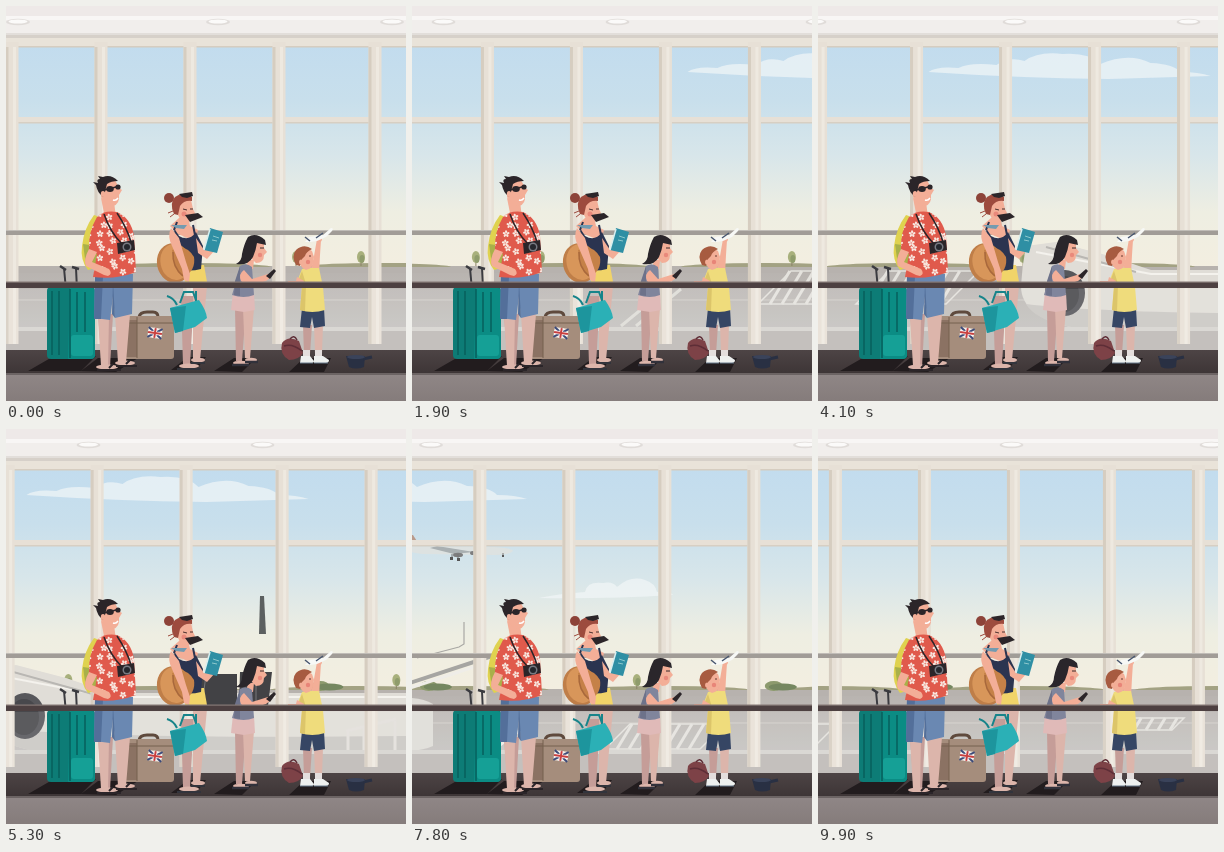
Recreate the animation shown at these times as an HTML page with a canvas. Size 400 by 395 pixels, loop 10 s.

```html
<!DOCTYPE html>
<html lang="en">
<head>
<meta charset="utf-8">
<title>Moving walkway</title>
<style>
html, body { margin: 0; width: 100%; height: 100%; overflow: hidden; background: #efebe9; }
canvas { display: block; width: 100%; height: 100%; }
</style>
</head>
<body>
<canvas id="c" width="400" height="395"></canvas>
<script>
const g = document.getElementById('c').getContext('2d');
const SKIN = '#f3ae97', SHADE = '#dc907c', LEG = '#dcb5ab', LEG_SHADE = '#c59d98', DARK = '#2b2529';

function box(color, x, y, w, h) {
  g.fillStyle = color;
  g.fillRect(x, y, w, h);
}
function fill(color, d) {
  g.fillStyle = color;
  g.fill(new Path2D(d));
}
function line(color, width, d) {
  g.strokeStyle = color;
  g.lineWidth = width;
  g.stroke(new Path2D(d));
}
function oval(color, x, y, rx, ry = rx, turn = 0) {
  g.fillStyle = color;
  g.beginPath();
  g.ellipse(x, y, rx, ry, turn, 0, 7);
  g.fill();
}
function round(color, x, y, w, h, r) {
  g.fillStyle = color;
  g.beginPath();
  g.roundRect(x, y, w, h, r);
  g.fill();
}
function at(x, y, draw) {
  g.save();
  g.translate(x, y);
  draw();
  g.restore();
}
function vertical(y0, y1, ...stops) {
  const grad = g.createLinearGradient(0, y0, 0, y1);
  stops.forEach((c, i) => grad.addColorStop(i / (stops.length - 1), c));
  return grad;
}
function random(seed) {
  return () => (seed = (seed * 16807) % 2147483647) / 2147483647;
}

const skyFill = vertical(38, 262, '#c2dcee', '#c8dfec', '#d8e6ea', '#eeeee2', '#f3eee0');
const roadFill = vertical(260, 330, '#b7b2ae', '#c6c4c1');

function clouds(n) {
  g.globalAlpha = 0.7;
  at(418 - 7.5 * n, 0, () => fill('#f3f7f8',
    'M0 66Q8 60 30 62Q42 56 68 59Q80 50 96 55Q110 45 134 48Q160 46 172 58Q200 46 222 57Q245 58 252 66Q270 66 282 70L180 73Q90 72 0 66'));
  at(1206 - 13.5 * n, 0, () => fill('#f3f7f8',
    'M-26 169Q-8 165 20 163Q22 152 38 154Q48 152 52 158Q66 146 80 151Q90 154 92 163Q104 161 108 166Q40 170 -26 169'));
  g.globalAlpha = 1;
}

function airliner(n) {
  at(22 * (n - 78), (n - 78) * 0.4, () => {
    fill('#dde2e1', 'M-20 117L82 118Q100 119 101 122Q98 126 82 126L10 125Q-10 122 -20 117');
    fill('#b99a8b', 'M-8 116L-4 106L1 106L8 117');
    fill('#a9b0b2', 'M62 123L25 117L18 119L42 125Z');
    oval('#7d7d7e', 46, 126, 5, 2.2);
    oval('#7d7d7e', 61, 124, 3, 2);
    line('#777', 1, 'M40 125V130M46 125V131M91 124V128');
    box('#555', 38, 128, 3, 3);
    box('#555', 45, 129, 3, 3);
    box('#555', 90, 126, 2, 2);
  });
}

function tree(x) {
  box('#8c8468', x - 0.5, 252, 1, 8);
  oval('#a8b07c', x, 251, 4, 6);
  oval('#8f9c6c', x + 1, 253, 2.5, 4);
}

function hatch(x, y, w, h) {
  line('#e4e2dd', 1.5, `M${x + h} ${y}H${x + w + h}L${x + w} ${y + h}H${x}Z`);
  for (let i = 12; i < w; i += 12) {
    line('#e4e2dd', 3, `M${x + i} ${y + h}L${x + i + h * 0.6} ${y}`);
  }
}

function ground(n) {
  box(roadFill, 0, 260, 400, 86);
  const far = -11.9 * n;
  for (let i = 0; i < 9; i++) oval('#a3a283', i * 200 + 180 + far, 261, 85, 4);
  box('#b7b2ae', 0, 261, 400, 6);
  [290, 355, 606, 693, 1021, 1153].forEach(x => tree(x + far));
  [945, 1290].forEach(x => {
    oval('#8c9a6d', x + far, 257, 9, 5);
    oval('#758760', x + far + 9, 258, 14, 3.5);
  });
  const near = -14 * n;
  line('#d2cfcb', 1, 'M0 294H400');
  hatch(612 + near, 265, 90, 33);
  hatch(1285 + near, 295, 95, 25);
  hatch(1690 + near, 289, 50, 12);
  line('#dedcd7', 3, `M${475 + near} 320L${520 + near} 283M${490 + near} 320L${535 + near} 283`);
}

function jet(n) {
  at(16 * (53 - n), 0, () => {
    fill('#5c6060', 'M253 205L254 167H258L260 205Z');
    line('#a9a8a4', 1.2, 'M405 229L447 218L452 215V193');
  });
  at(19 * (53 - n), 0, () => {
    fill('#e0ddd7', 'M-20 240L10 236L60 249L105 264H440Q490 270 490 290Q480 320 420 322H30Q-25 312 -25 280Q-24 260 -20 240');
    fill('#cac7c3', 'M-20 298Q100 312 480 306Q460 322 420 322H30Q-10 315 -20 298');
    line('#f4f2ed', 2, 'M-10 246L105 268H430');
    line('#b9b7b3', 2, 'M0 241L90 266');
    oval('#57575b', 19, 287, 20, 23);
    oval('#48484c', 18, 288, 15, 18);
    fill('#424245', 'M180 245H231V277H176ZM234 243H266L262 277H233Z');
    line('#77777a', 1, 'M200 246L196 276M250 244V276');
    line('#a6a5a2', 4, 'M430 268L555 227');
    line('#efede8', 3, 'M440 270L540 237');
    fill('#dedcd7', 'M440 272Q478 264 496 275V317Q470 328 440 314Z');
    oval('#4b484b', 455, 295, 18, 20);
    oval('#3e3b3f', 455, 295, 14, 16);
    line('#e2dfda', 3, 'M342 302V336M358 297V336M389 292V336M340 302L390 290');
    line('#ecebe6', 3, 'M520 330L580 290M538 334L585 300');
  });
}

function post(x) {
  box('#e7e0d6', x - 6.5, 36, 13, 302);
  box('#d6cdc0', x - 6.5, 41, 3, 297);
  box('#eee9e0', x + 1, 41, 3, 297);
}

function windows(n) {
  const shift = 15.45 * n;
  box('#d6d0c9', 0, 28, 400, 4);
  box('#e9e3d9', 0, 32, 400, 9);
  box('#d6cdc0', 0, 40, 400, 1.5);
  box('#e7e0d6', 0, 111, 400, 6);
  box('#d7cfc3', 0, 116, 400, 1.5);
  box('#d6d3cf', 0, 321, 400, 4);
  box('#bdb9b5', 0, 325, 400, 20);
  for (let k = 0; k < 6; k++) {
    for (let i = 0; i < 4; i++) {
      const x = 6 + 363 * k + 89 * i - shift;
      if (x > -10 && x < 410) post(x);
    }
  }
}

function ceiling(n) {
  box('#eee9e8', 0, 0, 400, 12);
  box('#f8f6f5', 0, 10, 400, 4);
  box('#f1eeec', 0, 14, 400, 14);
  box('#e2deda', 0, 27, 400, 2);
  for (let k = 0; k < 4; k++) {
    for (const d of [12, 212]) {
      const x = d + 374 * k - 9.5 * n;
      oval('#e0dcd9', x, 16, 12, 3.2);
      oval('#fbfaf9', x, 15.5, 9.5, 2.1);
    }
  }
}

function floor() {
  box('#a19c97', 0, 224, 400, 5);
  box('#c0bcb7', 0, 224, 400, 1);
  box('rgba(255,255,255,.1)', 0, 283, 400, 61);
  box(vertical(344, 368, '#4d4445', '#3d3536'), 0, 344, 400, 25);
  fill('#221c1e', 'M22 365L48 350H90L75 365ZM75 365L92 352H132L110 366ZM165 364L182 351H200L190 364ZM208 365L228 352H250L236 366ZM283 366L298 352H325L318 366Z');
}

function luggage() {
  line('#3b3b40', 2, 'M60 284L58 262M71 284L70 262');
  line('#3b3b40', 2.5, 'M54 260L60 264M66 261L73 263');
  round('#0d7c76', 41, 281, 48, 72, 4);
  fill('#0b8c84', 'M64 282H85Q89 282 89 286V350Q88 353 84 353H62Z');
  line('#075f5c', 1.5, 'M46 285V349M53 285V349M64 283V352M71 286V326M79 286V326');
  round('#15a096', 65, 329, 22, 21, 3);
  line('#5f4a3d', 3, 'M133 311Q134 306 141 306H147Q152 306 152 311');
  round('#a58d7c', 118, 310, 50, 43, 3);
  box('#8b7263', 118, 314, 13, 37);
  line('#75604f', 1, 'M131 311V352M118 317H168');
  at(149, 327, () => {
    g.rotate(0.15);
    box('#f3efe8', -7, -5, 14, 10);
    line('#3d4a78', 2, 'M-7 -5L7 5M-7 5L7 -5');
    line('#fff', 3.5, 'M0 -5V5M-7 0H7');
    line('#c8403f', 2, 'M0 -5V5M-7 0H7');
  });
}

const shirt = 'M91 211Q98 204 111 206Q125 212 128 230L130 266Q110 274 87 271L91 248L83 244Q82 226 91 211';

function man() {
  fill('#dfd24f', 'M88 209Q78 222 76 240Q74 254 82 264L95 260L97 212Z');
  fill('#a9b04a', 'M77 238L91 240V258L80 260Z');
  fill(LEG_SHADE, 'M92 308H107L104 361H96Z');
  fill(LEG, 'M109 308H124L120 357H112ZM92 310H103L102 360H95Z');
  oval(LEG, 101, 361, 11, 2.6);
  oval(LEG, 119, 357, 10, 2.6);
  line(DARK, 2, 'M91 364H115M110 360H131M103 362L107 358M120 358L124 354');
  fill('#6a88b2', 'M89 268H127L126 308L109 312L107 290L104 314L88 312Z');
  fill('#536f9a', 'M89 270H97L95 313H88ZM107 275L109 312L106 308Z');
  fill(SKIN, 'M95 192L108 196L110 211Q104 214 98 207Z');
  fill('#e05a4c', shirt);
  g.save();
  g.clip(new Path2D(shirt));
  const rnd = random(77);
  for (let i = 0; i < 36; i++) {
    const x = 81 + (i % 5) * 11 + rnd() * 6, y = 206 + Math.floor(i / 5) * 9 + rnd() * 6;
    for (let a = 0; a < 5; a++) {
      const turn = a * 1.257 + i;
      oval('#f8e6de', x + 2 * Math.cos(turn), y + 2 * Math.sin(turn), 1.5, 1.1, turn);
    }
  }
  g.restore();
  fill(SKIN, 'M83 243L91 246L86 256L103 263Q107 268 102 270L98 269L80 260Q77 254 83 243');
  line(DARK, 1.5, 'M98 208Q104 226 116 238M111 207Q121 222 125 236');
  fill(DARK, 'M111 237L128 234L129 244L112 248Z');
  oval('#777a82', 121, 241, 4.5);
  oval('#25272d', 121, 241, 3);
  fill(SKIN, 'M95 180Q99 173 109 174L113 182L116 184L113 189Q114 198 107 200Q99 198 95 191Z');
  fill(DARK, 'M97 191Q91 186 90 179L87 176L92 177Q90 173 94 173L92 170L97 171Q105 168 112 175Q105 175 101 178L99 186Z');
  oval(SKIN, 97, 188, 2.2, 3);
  line(DARK, 1.5, 'M98 184L114 180');
  oval(DARK, 104, 183, 3.8, 3);
  oval(DARK, 112, 181, 2.6, 2.6);
  line('#fff', 1.5, 'M107 194Q110 195 112 192');
}

function woman() {
  fill(LEG_SHADE, 'M175 290H188L184 359H177Z');
  fill(LEG, 'M187 280H201L194 354H187Z');
  oval(LEG, 183, 360, 10, 2.6);
  oval(LEG, 192, 354, 7, 2.3);
  line('#32343c', 2, 'M171 363H195M185 357H199');
  fill('#f1d469', 'M175 259H198L201 276L180 279Z');
  fill(SKIN, 'M173 212L182 211L184 220L192 224L189 235L172 228L164 220Z');
  fill('#2b3450', 'M168 222L173 230Q183 236 190 226L197 240L195 263Q183 266 173 263Z');
  line('#2b3450', 2, 'M168 224L171 216M189 229L187 219');
  fill('#739bb0', 'M160 216L165 219L181 219L178 223L170 222Z');
  fill(SKIN, 'M190 232L198 244L207 240L209 244L201 253L192 247Z');
  fill('#2f8fa4', 'M204 222L217 226L211 247L198 244Z');
  line('#d9eff0', 1.5, 'M204 223L198 244');
  line('#8cc8cc', 1, 'M207 230L213 232M206 234L211 235');
  oval('#bf7e48', 168, 257, 17, 20, -0.2);
  oval('#d8965a', 169, 256, 14.5, 18, -0.2);
  fill('#c58148', 'M166 244Q180 237 188 251Q190 264 178 271Q169 268 166 244');
  line('#a8683c', 1.5, 'M167 246Q166 261 177 270');
  fill(SKIN, 'M165 222Q161 230 166 240L176 263L178 274L183 276L184 268L180 256L173 232Z');
  line('#17848a', 2, 'M174 297L178 286L187 286L191 297M161 290Q168 292 171 299M190 285V297');
  fill('#2bb0b6', 'M164 302L193 294Q200 304 201 312L189 321L169 327Z');
  fill('#1d959d', 'M164 302L180 300L177 325L169 327Z');
  fill(SKIN, 'M171 197Q178 191 185 194L187 203L189 207L187 210Q185 217 177 216Q170 211 171 197');
  oval('#e9897b', 178, 208, 2.5);
  oval('#8d4339', 163, 192, 5, 5);
  fill('#9d4b3e', 'M168 208Q163 197 169 191Q177 185 186 191L186 195Q178 194 174 200L172 209Z');
  line('#9d4b3e', 1, 'M167 205L162 207M168 208L164 211');
  fill(DARK, 'M173 188L186 186L187 190L181 192L176 191Z');
  line('#4b302e', 1, 'M177 203L181 204M184 203L187 203');
  fill(DARK, 'M179 209L192 207L197 211L184 216Z');
}

function girl() {
  fill(LEG_SHADE, 'M229 302H240L236 355H230Z');
  fill(LEG, 'M237 302H248L244 352H239Z');
  oval(LEG, 235, 357, 8, 2.3);
  oval(LEG, 245, 354, 6, 2.3);
  line('#31313b', 2.5, 'M226 359H243M239 356H252');
  fill('#e0bab8', 'M227 286L248 287L249 304L238 306L225 304Z');
  fill(SKIN, 'M242 254L248 254L247 263L240 263Z');
  fill('#80859c', 'M234 260Q240 256 246 261L248 289Q238 293 226 289L231 272Z');
  fill('#6d728a', 'M234 260L229 275L228 289L234 290Z');
  fill(SKIN, 'M238 264Q232 268 235 275L241 281L260 275L265 271L262 268L246 273Z');
  fill(DARK, 'M260 270L268 263L270 265L264 273Z');
  fill(SKIN, 'M247 235L258 234L258 242L261 246L258 249Q258 257 250 257L245 252Z');
  oval('#e9897b', 254, 249, 2.2);
  fill('#2a262b', 'M259 234Q250 226 242 231Q238 238 236 248Q236 255 230 258Q242 260 247 251Q250 244 251 237L260 239Z');
  line('#3b2b2a', 1, 'M254 242L258 242');
}

function boy() {
  fill('#7d4247', 'M276 337Q282 329 293 335L297 347Q293 354 283 354Q273 348 276 337');
  line('#5e2e37', 1.5, 'M278 340Q286 337 296 345M284 333Q288 328 291 334');
  fill(LEG_SHADE, 'M297 319H306L304 348H298Z');
  fill(LEG, 'M308 319H317L316 347H309Z');
  box('#e4dedd', 297, 344, 7, 7);
  box('#e4dedd', 309, 344, 7, 7);
  fill('#eef0ef', 'M295 350H304L308 355Q308 357 305 357H294ZM308 350H317L323 354Q323 357 320 357H308Z');
  line('#66798b', 1, 'M294 357H307M308 357H322');
  fill('#364664', 'M296 302H318L319 320L308 322L306 311L304 322L294 321Z');
  fill(SKIN, 'M305 264L308 250L311 233L315 234L314 249L313 268Z');
  fill('#efdc7c', 'M296 263Q304 261 308 262L313 262L317 281L319 304Q306 308 294 304L296 281L290 278Z');
  fill('#dcc56a', 'M296 265L291 278L296 281L294 304L299 305L300 278Z');
  fill(SKIN, 'M291 271L298 275L297 281L289 280L282 279L282 275L290 275Z');
  fill(SKIN, 'M292 246Q300 240 306 245L308 251L307 255Q308 262 300 264Q292 261 292 246');
  oval('#e88578', 302, 256, 2.2);
  fill('#a75b40', 'M290 259Q285 250 290 244Q298 237 306 243Q300 246 299 250L296 253L294 260Z');
  oval(SKIN, 295, 256, 2, 2.6);
  line('#663a32', 1, 'M303 250L305 250');
  oval(SKIN, 313, 233, 3);
  fill('#f7f8f6', 'M299 236L303 231L317 229L325 222Q328 222 326 225L320 231L311 235L304 236Z');
  line('#48566f', 1.5, 'M310 232L317 227M299 231L304 235');
  fill('#293043', 'M340 350H359L358 361Q350 364 343 361Z');
  line('#293043', 3, 'M357 353L366 351');
  oval('#3a435a', 350, 351, 9, 2);
}

function front() {
  box('#4d4041', 0, 276, 400, 6);
  box('#857977', 0, 275.5, 400, 1.2);
  box('#6c6464', 0, 367, 400, 2);
  box(vertical(369, 395, '#8f8686', '#857c7b'), 0, 369, 400, 26);
}

function draw(n) {
  box(skyFill, 0, 0, 400, 395);
  clouds(n);
  airliner(n);
  ground(n);
  jet(n);
  windows(n);
  ceiling(n);
  floor();
  luggage();
  man();
  woman();
  girl();
  boy();
  front();
}

const start = performance.now();
function tick() {
  const t = (performance.now() - start) % 10000;
  draw(Math.floor(t / 100));
  requestAnimationFrame(tick);
}
tick();
</script>
</body>
</html>
```
